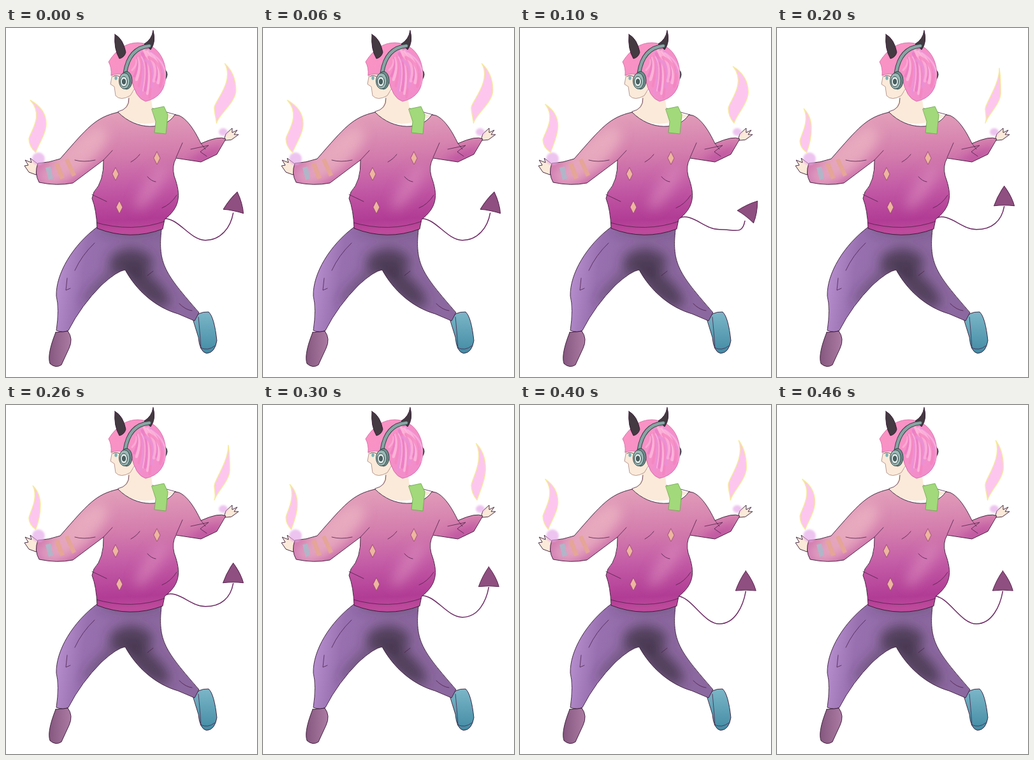
Write an HTML page that moves like this. It is 394 px wide and 547 px high and loops after 0.5 s.

```html
<!DOCTYPE html>
<html lang="en">
<head>
<meta charset="utf-8">
<title>Imp with flames</title>
<style>
html, body { margin: 0; width: 100%; height: 100%; overflow: hidden; background: #fff; }
svg { display: block; width: 394px; height: 547px; }
path { stroke-linejoin: round; stroke-linecap: round; }
.ink { stroke: #351733; stroke-width: .9; }
.line { fill: none; stroke: #4c2348; stroke-width: .8; }
.skin { fill: #fbead9; }
.soft { filter: url(#blur); }
.flame { fill: #fdc6ef; stroke: #f6ea9c; stroke-width: 1.4; }
#tail { fill: none; stroke: #6e2a66; stroke-width: 1.5; }
#head { fill: #8f4f80; stroke: #5a2552; }
</style>
</head>
<body>
<svg viewBox="0 0 394 547">
<defs>
  <filter id="blur" x="-60%" y="-60%" width="220%" height="220%"><feGaussianBlur stdDeviation="9"/></filter>
  <filter id="haze" x="-50%" y="-50%" width="200%" height="200%"><feGaussianBlur stdDeviation="1.5"/></filter>
  <linearGradient id="knit" gradientUnits="userSpaceOnUse" x1="195" y1="135" x2="205" y2="318">
    <stop offset="0" stop-color="#e29eb9"/><stop offset=".35" stop-color="#d37cad"/>
    <stop offset=".62" stop-color="#c35ba6"/><stop offset=".9" stop-color="#b13c95"/><stop offset="1" stop-color="#bd4a9b"/>
  </linearGradient>
  <linearGradient id="cloth" gradientUnits="userSpaceOnUse" x1="85" y1="380" x2="190" y2="395">
    <stop offset="0" stop-color="#b48ccc"/><stop offset=".35" stop-color="#9870b0"/><stop offset="1" stop-color="#8c68a0"/>
  </linearGradient>
  <linearGradient id="hairTone" x1="0" y1="0" x2="1" y2="1">
    <stop offset="0" stop-color="#fc94c2"/><stop offset="1" stop-color="#f08ccc"/>
  </linearGradient>
  <linearGradient id="shoeL" x1="0" y1="0" x2="1" y2="0">
    <stop offset="0" stop-color="#85577f"/><stop offset="1" stop-color="#ac7ba4"/>
  </linearGradient>
  <linearGradient id="shoeR" x1="0" y1="0" x2="0" y2="1">
    <stop offset="0" stop-color="#7cb6c8"/><stop offset="1" stop-color="#428ba4"/>
  </linearGradient>
  <path id="pants" d="M143 312C105 340 78 385 79 420Q84 440 79 474Q90 478 98 474Q118 435 150 403Q174 381 187 379C205 412 235 438 270 448L296 459 303 446C250 385 238 370 244 316Z"/>
  <path id="sweater" d="M176 132C140 140 128 156 85 205Q68 211 50 212Q44 228 52 242Q80 248 105 243L153 207Q154 240 138 257L135 267Q142 285 143 314Q195 334 246 315L249 300C272 282 276 264 264 232Q260 216 267 204L306 210 331 198 345 174Q335 168 306 181C296 160 284 142 271 137L265 136C250 160 205 162 176 132Z"/>
  <path id="hair" d="M165 74Q166 62 161 53Q180 23 207 23C235 24 250 45 251 72Q251 108 219 115Q203 110 197 80Q184 68 165 74Z"/>
  <path id="diamond" d="M0-10L5 0 0 10-5 0Z"/>
  <clipPath id="inPants"><use href="#pants"/></clipPath>
  <clipPath id="inSweater"><use href="#sweater"/></clipPath>
  <clipPath id="inHair"><use href="#hair"/></clipPath>
</defs>

<path id="tail"/>
<path id="head" d="M0-31Q-10-17-16 0Q0-2 16 0Q12-15 0-31Z"/>

<g>
  <path class="ink" fill="url(#shoeL)" d="M78 477L97 475Q106 487 99 502L87 528Q78 534 69 526Q64 512 78 477Z"/>
  <path class="ink" fill="url(#shoeR)" d="M294 458Q300 444 318 445Q327 453 331 490Q328 509 315 510Q304 508 302 485Z"/>
  <path class="line" d="M302 453Q304 472 306 501M305 501Q317 507 328 498"/>
  <g clip-path="url(#inPants)">
    <use href="#pants" fill="url(#cloth)"/>
    <g class="soft" fill="#3d3044">
      <ellipse cx="196" cy="368" rx="34" ry="22" opacity=".75"/>
      <ellipse cx="222" cy="406" rx="44" ry="17" transform="rotate(42 222 406)" opacity=".75"/>
      <ellipse cx="150" cy="402" rx="42" ry="7" transform="rotate(-45 150 402)" opacity=".5"/>
      <ellipse cx="195" cy="316" rx="52" ry="7" opacity=".4"/>
    </g>
  </g>
  <use href="#pants" class="ink" fill="none"/>
  <path class="line" d="M139 337Q119 356 108 380M96 392L94 411 101 408M222 388L231 381M272 432Q282 442 292 443"/>
</g>

<path class="ink skin" d="M50 213L38 204 40 211 30 207 35 215 29 216 36 226 47 230Z"/>
<path class="ink skin" d="M342 176L345 166 355 157 355 164 363 160 358 167 365 167 354 175Z"/>

<path class="skin" d="M191 98Q194 127 176 131Q205 165 265 138L230 126 227 105Z"/>
<path class="line" d="M193 110Q194 127 176 131M230 126L267 136"/>

<g clip-path="url(#inSweater)">
  <use href="#sweater" fill="url(#knit)"/>
  <g class="soft">
    <ellipse cx="108" cy="203" rx="66" ry="24" transform="rotate(-42 108 203)" fill="#edb6c3" opacity=".75"/>
    <ellipse cx="62" cy="232" rx="20" ry="14" fill="#df9fc4" opacity=".7"/>
    <ellipse cx="315" cy="202" rx="34" ry="9" transform="rotate(-25 315 202)" fill="#b8479c" opacity=".8"/>
    <ellipse cx="228" cy="250" rx="42" ry="12" transform="rotate(-55 228 250)" fill="#e094c2" opacity=".5"/>
  </g>
  <g fill="#e5a597">
    <path fill="#b0b6c8" d="M62 219L70 217 74 236 67 238Z"/>
    <path d="M76 213L83 211 92 235 85 237Z"/>
    <path d="M92 207L98 204 110 230 104 233Z"/>
  </g>
  <path class="line" d="M138 304Q198 322 252 302"/>
</g>
<use href="#sweater" class="ink" fill="none"/>
<path class="line" d="M153 207L167 192M108 207Q122 211 140 207M135 261L158 272M267 203L277 180M290 190L318 184 305 194 315 201M306 181L313 190M196 210Q205 205 210 198M222 233Q228 240 235 241M268 262Q258 277 245 282"/>
<g fill="#eeb69f" stroke="#8b4169" stroke-width=".7">
  <use href="#diamond" x="172" y="229"/><use href="#diamond" x="237" y="204"/><use href="#diamond" x="178" y="281"/>
</g>
<path fill="#a2d97a" stroke="#68a64d" stroke-width=".8" d="M229 127L248 123 254 136 251 166 233 164 235 147Z"/>

<g>
  <path class="skin" stroke="#9c7470" stroke-width=".7" d="M168 66L164 88 170 92 172 106Q180 115 195 106L205 90 198 65Z"/>
  <path class="line" d="M168 76Q172 73 178 76"/>
  <ellipse cx="172.500" cy="78.500" rx="2.200" ry="3" fill="#79b3ba"/>
  <path d="M249 66Q255 72 249 81" fill="none" stroke="#3b4a4c" stroke-width="3"/>
  <use href="#hair" fill="url(#hairTone)" stroke="#c9589b" stroke-width=".7"/>
  <g id="strands" clip-path="url(#inHair)" fill="none"></g>
  <path class="ink" fill="#443a41" d="M171 10Q169 33 178 48Q186 46 188 38Q184 17 171 10Z"/>
  <path class="ink" fill="#443a41" d="M231 4Q236 22 227 34L217 25Q229 18 231 4Z"/>
  <g fill="none" stroke-width="6.500" stroke="#394849">
    <path id="band" d="M225 28Q193 31 187 70"/>
    <use href="#band" style="stroke:#88a5a4;stroke-width:4.500"/>
  </g>
  <g stroke="#344647">
    <ellipse cx="189" cy="82" rx="9" ry="14" fill="#6f8d8d"/>
    <ellipse cx="186" cy="83" rx="8.500" ry="12.500" fill="#9ab9b7"/>
    <ellipse cx="185" cy="84" rx="5.500" ry="8" fill="#dce8e6"/>
    <ellipse cx="185" cy="84" rx="2.500" ry="4" fill="#4b6365"/>
  </g>
</g>

<g filter="url(#haze)" fill="#e4a4e6" opacity=".65">
  <circle cx="51" cy="205" r="10"/><ellipse cx="341" cy="163" rx="7" ry="6"/>
</g>
<path class="flame" id="left"/>
<path class="flame" id="right"/>
</svg>

<script>
const POSES = 5, STEP = 100;
const $ = id => document.getElementById(id);

let seed = 7;
const rnd = () => (seed = seed * 16807 % 2147483647) / 2147483647;

// Painted locks fan out from the crown.
const tones = ['#ffb9dc', '#e978c4', '#ffc6e4', '#f583bd', '#e793dc'];
$('strands').innerHTML = Array.from({ length: 16 }, (_, k) => {
  const x = 198 + k * 3.4, y = 66 + rnd() * 46;
  return `<path d="M${205 + k * 1.5} ${30 + rnd() * 22}Q${x + 8} 58 ${x} ${y}" stroke="${tones[k % 5]}"
    stroke-width="${2 + rnd() * 3}" opacity=".65"/>`;
}).join('');

// An S-shaped tongue: right bulge at x = far, left bulge at x = near.
function flame(tip, base, near, far) {
  const [x, y] = tip, [bx, by] = base;
  const at = f => y + f * (by - y);
  return `M${x} ${y}C${x + .6 * (far - x)} ${at(.1)} ${far} ${at(.25)} ${far} ${at(.45)}
    S${bx + 4} ${at(.85)} ${bx} ${by}
    C${near + 3} ${at(.92)} ${near} ${at(.84)} ${near} ${at(.74)}S${far - 2} ${at(.3)} ${x} ${y}Z`;
}

function draw(i) {
  // k swings per loop, peaking at pose p.
  const wave = (k, p) => Math.cos(2 * Math.PI * k * (i - p) / POSES);

  const flick = wave(2, 2), glow = wave(1, 0);
  $('left').setAttribute('d', flame(
    [40.4 - 2.2 * glow, 120 - 7 * wave(1, -.2)], [46 + 2 * wave(1, 1), 195], 36, 58 + 5 * glow));
  $('right').setAttribute('d', flame(
    [341 + 8 * flick, 59 + 4 * wave(1, 2)], [332 - 5 * flick, 149], 327, 355 + 6 * wave(1, .2)));

  const sag = 328 + 15 * wave(1, 4);
  const bend = Math.max(0, wave(1, .8)) ** 2;
  const x = 355 - 2 * wave(2, 1), y = 290 + 7 * wave(1, .3) + 8 * wave(2, 1);
  $('tail').setAttribute('d',
    `M246 299C270 ${293 + (sag - 328) * .5} 288 ${sag} 313 ${sag}S${x - 4} ${y + 22} ${x} ${y}`);
  $('head').setAttribute('transform', `translate(${x + bend} ${y - 1 - 6 * bend}) rotate(${40 * bend})`);
}

function tick() {
  draw(Math.floor(performance.now() / STEP) % POSES);
  requestAnimationFrame(tick);
}
tick();
</script>
</body>
</html>
```
